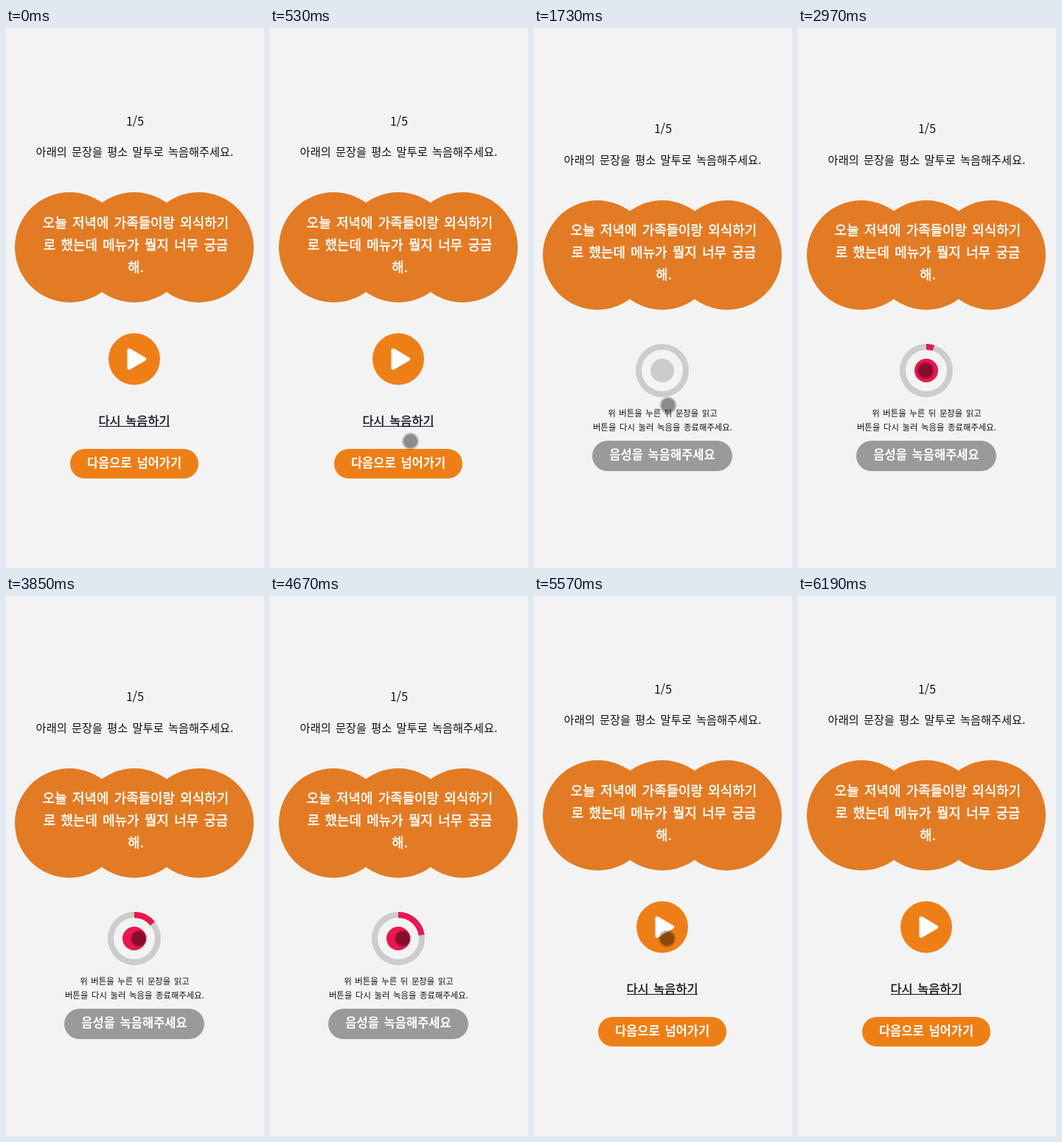
Write an HTML page that moves like this. It is 350x730 px and loops after 6850 ms.

```html
<!DOCTYPE html>
<html lang="ko">
<head>
<meta charset="utf-8">
<style>
  html, body { margin: 0; width: 100%; height: 100%; overflow: hidden; background: #f3f3f3; }
  svg { display: block; width: 350px; height: 730px; }
  text {
    font-family: "Noto Sans CJK KR", "Noto Sans CJK", "Noto Sans KR", sans-serif;
    text-anchor: middle; word-spacing: .13em; fill: #111;
  }
  .count { font-size: 16px; }
  .lead { font-size: 15.25px; }
  .sentence { font-size: 17.9px; fill: #fff; stroke: #fff; stroke-width: .5px; }
  .link { font-size: 16.35px; fill: #1a1020; stroke: #1a1020; stroke-width: .35px; }
  .button { font-size: 16.5px; font-weight: 700; fill: #fff; }
  .hint { font-size: 11.35px; }
</style>
</head>
<body>
<svg viewBox="0 0 350 730">
  <rect width="350" height="730" fill="#f3f3f3"/>
  <g id="review">
    <g fill="#e27b24">
      <circle cx="86.5" cy="296.5" r="74.5"/><circle cx="174" cy="296.5" r="74.5"/><circle cx="261.5" cy="296.5" r="74.5"/>
    </g>
    <text class="count" x="175" y="132">1/5</text>
    <text class="lead" x="174.5" y="173">아래의 문장을 평소 말투로 녹음해주세요.</text>
    <text class="sentence" x="176" y="270">오늘 저녁에 가족들이랑 외식하기</text>
    <text class="sentence" x="176" y="299.5">로 했는데 메뉴가 뭘지 너무 궁금</text>
    <text class="sentence" x="176" y="329.5">해.</text>
    <circle cx="174" cy="447.5" r="35" fill="#ee7f17"/>
    <path d="M167 435.5L187.5 447.5L167 459.5Z" fill="#fff" stroke="#fff" stroke-width="5" stroke-linejoin="round"/>
    <text class="link" x="174" y="537">다시 녹음하기</text>
    <path d="M126 538.5H222" stroke="#1a1020"/>
    <rect x="87" y="569" width="174" height="40" rx="20" fill="#ee7f17"/>
    <text class="button" x="174" y="594">다음으로 넘어가기</text>
  </g>
  <g id="record">
    <g fill="#e27b24">
      <circle cx="86" cy="307" r="74"/><circle cx="174" cy="307" r="74"/><circle cx="262" cy="307" r="74"/>
    </g>
    <text class="count" x="175" y="142">1/5</text>
    <text class="lead" x="174.5" y="184">아래의 문장을 평소 말투로 녹음해주세요.</text>
    <text class="sentence" x="176" y="280">오늘 저녁에 가족들이랑 외식하기</text>
    <text class="sentence" x="176" y="310">로 했는데 메뉴가 뭘지 너무 궁금</text>
    <text class="sentence" x="176" y="340">해.</text>
    <circle cx="174" cy="463" r="32" fill="none" stroke="#ccc" stroke-width="8"/>
    <path id="arc" fill="none" stroke="#e9174f" stroke-width="8"/>
    <circle id="dot" cx="174" cy="463" r="16"/>
    <text class="hint" x="174.5" y="525">위 버튼을 누른 뒤 문장을 읽고</text>
    <text class="hint" x="174.5" y="544">버튼을 다시 눌러 녹음을 종료해주세요.</text>
    <rect x="79" y="558" width="190" height="41" rx="20.5" fill="#9b9999"/>
    <text class="button" x="174" y="583">음성을 녹음해주세요</text>
  </g>
  <g id="cursor">
    <circle id="halo" r="11.5"/>
    <circle id="core" r="9.5"/>
  </g>
</svg>
<script>
const LOOP = 6850;
const el = id => document.getElementById(id);
const show = (id, on) => el(id).setAttribute('display', on ? 'inline' : 'none');

// Bursts of screen updates: first time, last time, count.
const bursts = [
  [0, 0, 1], [130, 670, 9], [870, 1000, 3], [1270, 1330, 2], [1730, 2010, 5], [2430, 3110, 11],
  [3170, 3850, 11], [3910, 4530, 10], [4600, 5240, 10], [5300, 5570, 5], [5850, 6190, 6]
];
const ticks = bursts.flatMap(([from, to, n]) =>
  Array.from({ length: n }, (_, i) => n < 2 ? from : Math.round((from + (to - from) * i / (n - 1)) / 10) * 10));
const snap = t => ticks.filter(tick => tick <= t).pop();

const linear = p => p;
const easeOut = p => 1 - (1 - p) ** 2;
const easeIn = p => p ** 1.6;

// Pointer moves: start, end, from, to, easing.
const moves = [
  [130, 670, [339, 719], [167, 533], easeOut],
  [800, 1000, [167, 533], [181, 533], easeOut],
  [1660, 1730, [181, 533], [182, 510], linear],
  [1730, 2010, [182, 510], [173, 463], easeOut],
  [3110, 3380, [173, 463], [180.5, 463], easeOut],
  [5790, 6120, [180.5, 463], [288, 693], easeIn]
];
function pointer(t) {
  const [start, end, a, b, ease] = moves.filter(m => m[0] <= t).pop() || moves[0];
  const p = ease(Math.min(1, Math.max(0, (t - start) / (end - start))));
  return a.map((v, i) => v + (b[i] - v) * p);
}

const clicks = [[1270, 1330], [2430, 2500], [5500, 5570]];
const within = (t, [from, to]) => t >= from && t < to;

function arcPath(degrees) {
  const a = degrees * Math.PI / 180;
  return `M174 431A32 32 0 0 1 ${174 + 32 * Math.sin(a)} ${463 - 32 * Math.cos(a)}`;
}

function render(now) {
  const t = snap(now % LOOP);
  const recordPage = within(t, [1330, 5570]);
  show('review', !recordPage);
  show('record', recordPage);

  const recording = t >= 2490;
  show('arc', recording);
  if (recording) el('arc').setAttribute('d', arcPath((t - 2490) * 0.0375));
  el('dot').setAttribute('fill', recording ? '#e9174f' : '#ccc');

  show('cursor', within(t, [130, 6190]));
  el('cursor').setAttribute('transform', `translate(${pointer(t)})`);
  const pressed = clicks.some(c => within(t, c));
  el('halo').setAttribute('fill', pressed ? 'rgba(205,210,20,.72)' : 'rgba(0,0,0,.2)');
  el('core').setAttribute('fill', pressed ? 'rgba(150,150,0,.22)' : 'rgba(0,0,0,.28)');
}

const began = performance.now();
function frame() {
  render(performance.now() - began);
  requestAnimationFrame(frame);
}
frame();
</script>
</body>
</html>
```
